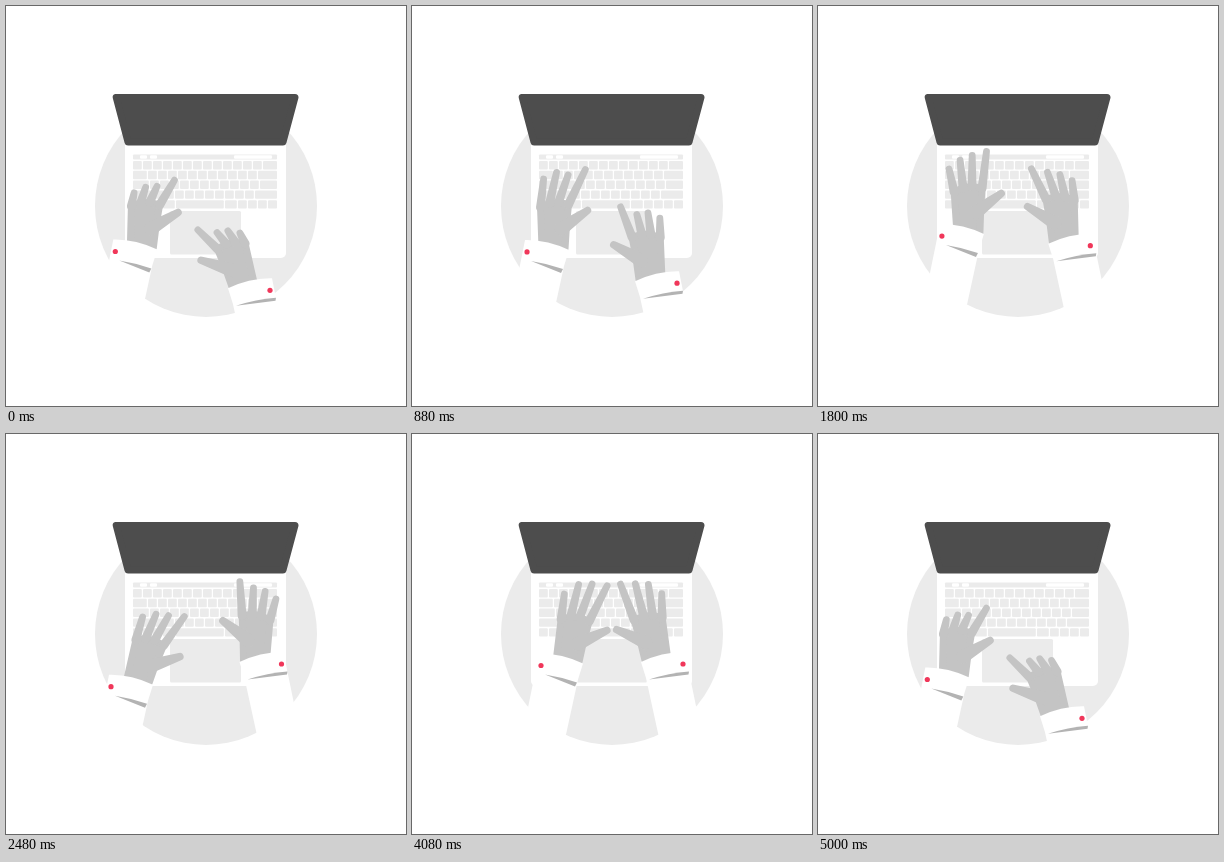
Write an HTML page with a canvas that moves like this. It is 400x400 px and loops after 5.04 s.

```html
<!DOCTYPE html>
<html>
<head>
<meta charset="utf-8">
<title>Typing hands</title>
<style>
  html, body { margin: 0; width: 100%; height: 100%; overflow: hidden; background: #fff; }
  canvas { display: block; }
</style>
</head>
<body>
<canvas id="stage" width="400" height="400"></canvas>
<script>
const ctx = document.getElementById('stage').getContext('2d');
const LOOP = 5040;
const LIGHT = '#ebebeb', SKIN = '#c4c4c4', SHADE = '#b3b3b3', DARK = '#4d4d4d', RED = '#f0375a';

// Start and end of each move to the next pose; the hands rest in between
const moves = [[580, 880], [880, 1800], [1800, 2480], [2760, 3120], [3120, 4080], [4440, 5000]];

// Pose: cuff button x, y, hand tilt and finger aim in degrees towards the thumb, finger reach
const left = {
  side: 1,
  shade: new Path2D('M4 9Q20 11.5 36 17L34 21Z'),
  poses: [
    [109.3, 245.5, 4, 21, 0.57],
    [115, 246, 0, 16, 1.1],
    [124, 230, -2, -3, 1],
    [105, 252.7, 17, 26, 0.92],
    [118, 240, 17, 22, 0.9],
    [129, 231.5, 10, 17, 1.15]
  ]
};
const right = {
  side: -1,
  shade: new Path2D('M34 15.5Q14 9-6 7.5L-5.5 10.5Z'),
  poses: [
    [264, 284.3, 17, 36, 0.48],
    [265, 277.3, 5, 11, 0.75],
    [272.3, 239.7, 4, 16, 0.83],
    [275.5, 230, -3, -6, 0.85],
    [275.5, 227.7, 17, 23, 0.9],
    [271, 230, 11, 11, 1.08]
  ]
};

// Hand proportions around the wrist, little finger first
const knuckles = [[-13, -37], [-4, -41], [5, -42], [15, -40]];
const lengths = [26, 29, 31, 37];
const wrist = [26.5, -7.5];
const sleeve = new Path2D('M-2-12Q20-12.5 42-2L37 14 15 115-28 115-6 8Z');

const rad = degrees => degrees * Math.PI / 180;

function box(x, y, w, h, r, color) {
  ctx.fillStyle = color;
  ctx.beginPath();
  ctx.roundRect(x, y, w, h, r);
  ctx.fill();
}

function disc(x, y, r, color) {
  ctx.fillStyle = color;
  ctx.beginPath();
  ctx.arc(x, y, r, 0, 2 * Math.PI);
  ctx.fill();
}

function roundedShape(points, r, color) {
  ctx.fillStyle = ctx.strokeStyle = color;
  ctx.lineWidth = 2 * r;
  ctx.beginPath();
  points.forEach(p => ctx.lineTo(...p));
  ctx.closePath();
  ctx.fill();
  ctx.stroke();
}

// Limb that narrows from radius r0 to r1, with round ends
function limb([x0, y0], r0, [x1, y1], r1) {
  const a = Math.atan2(y1 - y0, x1 - x0) + Math.PI / 2;
  ctx.fillStyle = SKIN;
  ctx.beginPath();
  ctx.arc(x0, y0, r0, a, a + Math.PI);
  ctx.arc(x1, y1, r1, a - Math.PI, a);
  ctx.fill();
}

// Row of ten-pixel keys with its own first key; the last one fills the row
function drawKeys(y, first, count, space = -1) {
  let x = 127;
  for (let i = 0; i <= count; i++) {
    const w = i === 0 ? first : i === space ? 49 : Math.abs(i - space) === 1 ? 13 : 10;
    const end = i === count ? 272.2 : x + w;
    box(x, y, end - x - 1.2, 8.4, 1, LIGHT);
    x = end;
  }
}

function drawLaptop() {
  disc(200, 200, 111, LIGHT);
  box(119, 134, 161, 118, 5, '#fff');
  box(127, 148.5, 144, 5, 1, LIGHT);
  for (const [x, w] of [[134, 7], [144, 7], [228, 38]]) box(x, 149.2, w, 3.6, 1, '#fff');
  drawKeys(155, 10, 13);
  drawKeys(164.8, 15, 12, -9);
  drawKeys(174.6, 17, 12, -9);
  drawKeys(184.4, 22, 11, -9);
  drawKeys(194.2, 10, 9, 4);
  box(164, 205, 71, 43.5, 1.5, LIGHT);
  roundedShape([[110.2, 91.4], [289, 91.4], [277, 136], [122, 136]], 3.5, DARK);
}

function poseAt(poses, t) {
  const i = moves.findIndex(([, end]) => t < end);
  if (i < 0) return poses[0];
  const [start, end] = moves[i];
  const u = Math.max(0, (t - start) / (end - start));
  const eased = 1 - (1 - u) ** 3;
  const next = poses[(i + 1) % poses.length];
  return poses[i].map((v, k) => v + (next[k] - v) * eased);
}

// Typing ripple that runs across the three outer fingers
function tap(finger, t) {
  if (finger === 3) return 0;
  const wave = Math.cos(2 * Math.PI * (t - 880) / 256 - (finger - 2) * Math.PI / 2);
  return 0.2 * Math.max(0, wave) ** 2;
}

function drawHand(tilt, aim, reach, t) {
  const c = Math.cos(rad(tilt)), s = Math.sin(rad(tilt));
  const turn = ([x, y]) => [x * c - y * s, x * s + y * c];
  const joints = knuckles.map(turn);

  roundedShape([[-11.5, 4], ...joints, turn([13, -20]), [11.5, 4]], 3.5, SKIN);
  limb(turn([8, -16]), 7, turn([34, -34]), 3.7);
  joints.forEach(([x, y], i) => {
    const stretch = i === 3 ? (1 + reach) / 2 : reach;
    const length = lengths[i] * (stretch - tap(i, t) * (reach - 0.3));
    const a = rad(aim + 6.5 * (i - 1.5));
    limb([x, y], 4.5, [x + length * Math.sin(a), y - length * Math.cos(a)], 3.4);
  });
}

function drawArm({ side, shade, poses }, t) {
  const [x, y, tilt, aim, reach] = poseAt(poses, t);
  ctx.save();
  ctx.translate(x, y);
  ctx.scale(side, 1);

  ctx.save();
  ctx.translate(...wrist);
  drawHand(tilt, aim, reach, t);
  ctx.restore();

  ctx.fillStyle = '#fff';
  ctx.fill(sleeve);
  ctx.fillStyle = SHADE;
  ctx.fill(shade);
  disc(0, 0, 2.6, RED);
  ctx.restore();
}

function draw() {
  const t = performance.now() % LOOP;
  ctx.fillStyle = '#fff';
  ctx.fillRect(0, 0, 400, 400);
  ctx.lineJoin = 'round';
  drawLaptop();
  drawArm(left, t);
  drawArm(right, t);
  requestAnimationFrame(draw);
}
draw();
</script>
</body>
</html>
```
